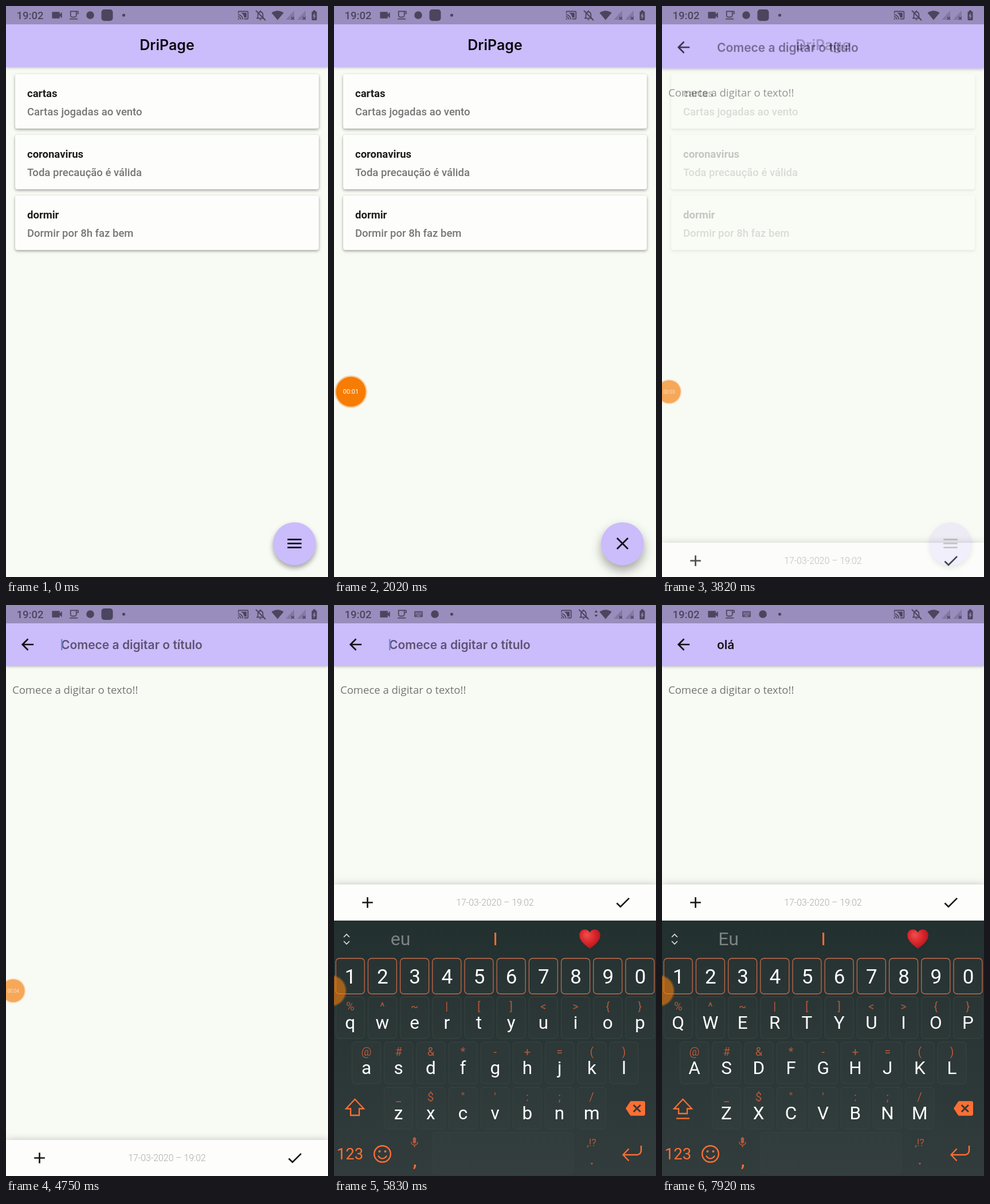
An HTML page with a canvas that plays this animation: 562 by 997 pixels, repeating every 7990 ms.

```html
<!DOCTYPE html>
<html lang="pt">
<head>
<meta charset="utf-8">
<title>Notas</title>
<style>
html, body { margin: 0; width: 100%; height: 100%; overflow: hidden; background: #f8faf4; }
canvas { display: block; width: 562px; height: 997px; }
</style>
</head>
<body>
<canvas id="stage"></canvas>
<script>
const W = 562, H = 997, LOOP = 7990;
const LILAC = '#cbbcfb', PAGE = '#f8faf4', INK = '#4b455e', ORANGE = '#fb6f35', DIM = '#b4583b';
const KEY_EDGE = '#35413f', KEY_FILL = 'rgba(255,255,255,.012)';
const ROBOTO = 'Roboto, sans-serif', TITLE = 'Inter, sans-serif';

const dpr = window.devicePixelRatio || 1;
function makeContext(canvas) {
  canvas.width = W * dpr;
  canvas.height = H * dpr;
  const c = canvas.getContext('2d');
  c.scale(dpr, dpr);
  return c;
}
const screen2d = makeContext(document.getElementById('stage'));
const layer2d = makeContext(document.createElement('canvas'));
let g = screen2d;

const icons = {
  video: 'M17 10.5V7c0-.55-.45-1-1-1H4c-.55 0-1 .45-1 1v10c0 .55.45 1 1 1h12c.55 0 1-.45 1-1v-3.5l4 4v-11l-4 4z',
  cup: 'M20 3H4v10c0 2.21 1.79 4 4 4h6c2.21 0 4-1.79 4-4v-3h2c1.11 0 2-.9 2-2V5c0-1.11-.89-2-2-2zm0 5h-2V5h2v3zM6 5v8c0 1.1.9 2 2 2h6c1.1 0 2-.9 2-2V5zM3 19h17v2H3z',
  keyboard: 'M20 5H4c-1.1 0-2 .9-2 2v10c0 1.1.9 2 2 2h16c1.1 0 2-.9 2-2V7c0-1.1-.9-2-2-2zM5 8h2v2H5zM8 8h2v2H8zM11 8h2v2h-2zM14 8h2v2h-2zM17 8h2v2h-2zM5 11h2v2H5zM8 11h2v2H8zM11 11h2v2h-2zM14 11h2v2h-2zM17 11h2v2h-2zM8 15h8v2H8z',
  cast: 'M21 3H3c-1.1 0-2 .9-2 2v3h2V5h18v14h-7v2h7c1.1 0 2-.9 2-2V5c0-1.1-.9-2-2-2zM1 18v3h3c0-1.66-1.34-3-3-3zm0-4v2c2.76 0 5 2.24 5 5h2c0-3.87-3.13-7-7-7zm0-4v2c4.97 0 9 4.03 9 9h2c0-6.08-4.93-11-11-11zM19 7H6c5 1.5 7 5 8 10h5z',
  bell: 'M12 22c1.1 0 2-.9 2-2h-4c0 1.1.9 2 2 2zm6-6v-5c0-3.07-1.63-5.64-4.5-6.32V4c0-.83-.67-1.5-1.5-1.5s-1.5.67-1.5 1.5v.68C7.64 5.36 6 7.92 6 11v5l-2 2v1h16v-1l-2-2zm-2 1H8v-6c0-2.48 1.51-4.5 4-4.5s4 2.02 4 4.5v6z',
  edit: 'M3 17.25V21h3.75L17.81 9.94l-3.75-3.75L3 17.25zM20.71 7.04c.39-.39.39-1.02 0-1.41l-2.34-2.34c-.39-.39-1.02-.39-1.41 0l-1.83 1.83 3.75 3.75 1.83-1.83z',
  bulb: 'M9 21c0 .55.45 1 1 1h4c.55 0 1-.45 1-1v-1H9v1zm3-19C8.14 2 5 5.14 5 9c0 2.38 1.19 4.47 3 5.74V17c0 .55.45 1 1 1h6c.55 0 1-.45 1-1v-2.26c1.81-1.27 3-3.36 3-5.74 0-3.86-3.14-7-7-7zm2.85 11.1l-.85.6V16h-4v-2.3l-.85-.6C7.8 12.16 7 10.63 7 9c0-2.76 2.24-5 5-5s5 2.24 5 5c0 1.63-.8 3.16-2.15 4.1z',
  back: 'M20 11H7.83l5.59-5.59L12 4l-8 8 8 8 1.41-1.41L7.83 13H20v-2z',
  check: 'M9 16.17L4.83 12l-1.42 1.41L9 19 21 7l-1.41-1.41z',
  add: 'M19 13h-6v6h-2v-6H5v-2h6V5h2v6h6v2z',
  erase: 'M22 3H7c-.69 0-1.23.35-1.59.88L0 12l5.41 8.11c.36.53.9.89 1.59.89h15c1.1 0 2-.9 2-2V5c0-1.1-.9-2-2-2zm-3 12.59L17.59 17 14 13.41 10.41 17 9 15.59 12.59 12 9 8.41 10.41 7 14 10.59 17.59 7 19 8.41 15.41 12 19 15.59z',
  mic: 'M12 14c1.66 0 3-1.34 3-3V5c0-1.66-1.34-3-3-3S9 3.34 9 5v6c0 1.66 1.34 3 3 3zm5.3-3c0 3-2.54 5.1-5.3 5.1S6.7 14 6.7 11H5c0 3.41 2.72 6.23 6 6.72V21h2v-3.28c3.28-.48 6-3.3 6-6.72h-1.7z',
  heart: 'M12 21.3C7.5 17.8 2 13.8 2 8.3 2 5.2 4.4 3 7.2 3c2.1 0 3.9 1.2 4.8 3 .9-1.8 2.7-3 4.8-3C19.6 3 22 5.2 22 8.3c0 5.5-5.5 9.5-10 13z'
};
for (const k in icons) icons[k] = new Path2D(icons[k]);

const clamp = v => Math.max(0, Math.min(1, v));
const ramp = (t, a, b) => clamp((t - a) / (b - a));
const mix = (a, b, k) => a + (b - a) * k;

function bezier(x1, y1, x2, y2) {
  const at = (a, b, s) => 3 * a * s * (1 - s) ** 2 + 3 * b * s * s * (1 - s) + s ** 3;
  return x => {
    let lo = 0, hi = 1;
    for (let i = 0; i < 20; i++) {
      const s = (lo + hi) / 2;
      if (at(x1, x2, s) < x) lo = s; else hi = s;
    }
    return at(y1, y2, lo);
  };
}
const fastOutSlowIn = bezier(.4, 0, .2, 1);
const easeIn = bezier(.42, 0, 1, 1);

function text(s, x, y, font, color, align = 'left') {
  g.font = font;
  g.fillStyle = color;
  g.textAlign = align;
  g.fillText(s, x, y);
}
function icon(name, x, y, size, color) {
  g.save();
  g.translate(x - size / 2, y - size / 2);
  g.scale(size / 24, size / 24);
  g.fillStyle = color;
  g.fill(icons[name], 'evenodd');
  g.restore();
}
function rect(x, y, w, h, color, r = 0) {
  g.beginPath();
  g.roundRect(x, y, w, h, r);
  g.fillStyle = color;
  g.fill();
}
function disc(x, y, r, color) {
  g.beginPath();
  g.arc(x, y, Math.max(0, r), 0, 7);
  g.fillStyle = color;
  g.fill();
}
function ring(x, y, r, color, width, from = 0, to = 2 * Math.PI) {
  g.beginPath();
  g.arc(x, y, r, from, to);
  g.strokeStyle = color;
  g.lineWidth = width;
  g.stroke();
}
function line(points, color, width, close) {
  g.beginPath();
  points.forEach(([x, y]) => g.lineTo(x, y));
  if (close) g.closePath();
  g.strokeStyle = color;
  g.lineWidth = width;
  g.stroke();
}
function shadowed(dy, blur, alpha, draw) {
  g.save();
  g.shadowColor = `rgba(0,0,0,${alpha})`;
  g.shadowOffsetY = dy * dpr;
  g.shadowBlur = blur * dpr;
  draw();
  g.restore();
}
// Draws a group as one sheet with a shared opacity.
function sheet(alpha, dy, draw) {
  if (alpha <= 0) return;
  g = layer2d;
  g.clearRect(0, 0, W, H);
  draw();
  g = screen2d;
  g.globalAlpha = alpha;
  g.drawImage(layer2d.canvas, 0, dy, W, H);
  g.globalAlpha = 1;
}

function header() {
  rect(0, 0, W, H, PAGE);
  shadowed(1.5, 5, .28, () => rect(0, 0, W, 106.5, LILAC));
}

function menuIcon(m) {
  const k = clamp(m / .45), len = mix(24.5, m > .9 ? 27 : 23, m);
  const bar = (angle, dy, alpha) => {
    g.save();
    g.globalAlpha *= alpha;
    g.translate(503.5, 938.5 + dy);
    g.rotate(angle * Math.PI / 180);
    rect(-len / 2, -1.35, len, 2.7, '#0b0a10');
    g.restore();
  };
  bar(45 * m, -7 * (1 - k), 1);
  bar(0, 0, 1 - k);
  bar(45 * m + 90 * k, 7 * (1 - k), 1);
}

function mini(name, y, s) {
  if (s <= 0) return;
  const d = 63 * s;
  shadowed(5, 9, .35, () => disc(503.5, y, d / 2, LILAC));
  icon(name, 503.5, y, Math.min(33, d * .63), '#0b0a10');
}

function listPage(t) {
  header();
  text('DriPage', 281, 77, `600 25px ${TITLE}`, '#08070c', 'center');
  [['cartas', 'Cartas jogadas ao vento'],
   ['coronavirus', 'Toda precaução é válida'],
   ['dormir', 'Dormir por 8h faz bem']].forEach(([name, body], i) => {
    const y = 119 + 106 * i;
    shadowed(2, 5, .36, () => rect(16, y, 530, 95, '#fdfefb', 4));
    text(name, 37, y + 40, `700 18.5px ${ROBOTO}`, '#1c1d1c');
    text(body, 37, y + 71.5, `500 18.5px ${ROBOTO}`, '#757675');
  });

  const close = 1 - ramp(t, 3440, 3593);
  const open = ramp(t, 2030, 2190) * close;
  const lift = ramp(t, 1850, 1980) * (1 - ramp(t, 2150, 2300));
  const s = clamp(open * 1.4);
  mini('edit', 761 + 30 * (1 - open), open);
  mini('bulb', 846 + 14 * (1 - s), s);
  shadowed(mix(5, 9, lift), mix(9, 18, lift), .34, () => disc(503.5, 939, 37.5, LILAC));
  menuIcon(Math.min(ramp(t, 1870, 2000), clamp(close * 1.1)));
}

function editPage(t) {
  header();
  const typed = 'olá'.slice(0, [6250, 6620, 7050].filter(x => t >= x).length);
  icon('back', 37.5, 69, 32, '#0d0b12');
  const font = `600 21px ${TITLE}`;
  text(typed || 'Comece a digitar o título', 96, 77, font, typed ? '#15121c' : '#5c5374');
  const typing = t > 6250 && t < 7300;
  if (t > 4600 && t < 7750 && (typing || (t - 4600) % 1000 < 500)) {
    g.font = font;
    rect(96 + (typed ? g.measureText(typed).width : 0), 59.5, 2.5, 19.5, '#6f8fdf');
  }
  text('Comece a digitar o texto!!', 11, 155, '400 18.5px "Open Sans", sans-serif', '#747674');

  const y = t < 4900 ? 934 : 488;
  shadowed(5, 16, .42, () => rect(0, y, W, 63, '#fdfefb'));
  icon('add', 58.5, y + 31.5, 32, '#17171a');
  text('17-03-2020 – 19:02', 281, y + 37, `300 15.8px ${ROBOTO}`, '#a9aba9', 'center');
  icon('check', 504, y + 31.5, 32, '#17171a');
}

function key(x, y, w, h, border, fill) {
  rect(x, y, w, h, fill, 6);
  g.strokeStyle = border;
  g.lineWidth = 1.3;
  g.stroke();
}

function keyRow(letters, hints, x0, y, caps) {
  [...letters].forEach((c, i) => {
    const x = x0 + 56.2 * i;
    key(x - 25, y, 50, 73, KEY_EDGE, KEY_FILL);
    text(hints[i], x, y + 24, `400 20px ${ROBOTO}`, DIM, 'center');
    text(caps ? c.toUpperCase() : c, x, y + 56, `400 31.5px ${ROBOTO}`, '#fff', 'center');
  });
}

function suggestions(caps) {
  line([[17, 580], [22, 575], [27, 580]], '#dfe3e2', 1.6);
  line([[17, 587], [22, 592], [27, 587]], '#dfe3e2', 1.6);
  text(caps ? 'Eu' : 'eu', 116, 594, `400 32px ${ROBOTO}`, '#7b8384', 'center');
  text('I', 281.5, 594, `400 32px ${ROBOTO}`, ORANGE, 'center');
  const red = g.createRadialGradient(9, 8, 1, 11, 10, 13);
  red.addColorStop(0, '#ee4a48');
  red.addColorStop(.5, '#d8252b');
  red.addColorStop(1, '#a5141d');
  icon('heart', 446.5, 583, 44, red);
}

function keyboard(caps, ready) {
  const back = g.createLinearGradient(0, 551, 0, H);
  back.addColorStop(0, '#22302f');
  back.addColorStop(1, '#323c3c');
  rect(0, 551, W, 446, back);
  g.globalAlpha = ready;
  suggestions(caps);
  g.globalAlpha = 1;

  [...'1234567890'].forEach((c, i) => {
    const x = 28.2 + 56.2 * i;
    key(x - 25, 617, 50, 62, '#c8694a', KEY_FILL);
    text(c, x + .5, 660.5, `400 35px ${ROBOTO}`, '#fff', 'center');
  });
  keyRow('qwertyuiop', '%^~|[]<>{}', 28.2, 684, caps);
  keyRow('asdfghjkl', '@#&*-+=()', 56.5, 763, caps);
  keyRow('zxcvbnm', '_$"\':;/', 112.5, 842, caps);

  const b = caps ? 888 : 891;
  line([[36.5, 863], [52, 879.5], [44, 879.5], [44, b], [29, b], [29, 879.5], [21, 879.5]], ORANGE, 2.3, true);
  if (caps) line([[25, 896.5], [48, 896.5]], ORANGE, 2.3);
  icon('erase', 526, 879, 34, ORANGE);

  text('123', 28, 967.5, `400 27.5px ${ROBOTO}`, ORANGE, 'center');
  ring(84.5, 958.5, 14.3, ORANGE, 2.4);
  ring(84.5, 958.5, 8, ORANGE, 2.2, .12 * Math.PI, .88 * Math.PI);
  disc(79.5, 954, 2, ORANGE);
  disc(89.5, 954, 2, ORANGE);
  icon('mic', 140.5, 938.5, 22, DIM);
  text(',', 141, 980, `500 30px ${ROBOTO}`, ORANGE, 'center');
  key(172, 921, 246, 73, KEY_EDGE, KEY_FILL);
  text(',!?', 449.5, 945, `400 18px ${ROBOTO}`, DIM, 'center');
  text('.', 450, 977, `500 24px ${ROBOTO}`, DIM, 'center');
  g.lineJoin = 'round';
  line([[536, 944], [536, 954], [534, 958], [530, 960], [505, 960]], ORANGE, 2.5);
  line([[514.5, 949.5], [504.5, 960], [514.5, 970.5]], ORANGE, 2.5);
  g.lineJoin = 'miter';
}

function statusBar(t) {
  rect(0, 0, W, 32, 'rgba(0,0,0,.25)');
  text('19:02', 18.5, 23, `500 18.5px ${ROBOTO}`, INK);
  icon('video', 89, 16, 23, INK);
  icon('cup', 118.5, 16, 20, INK);
  const p = ramp(t, 4870, 5000);
  g.globalAlpha = .8 * p ** 5;
  icon('keyboard', 147.5, 16, 18, INK);
  g.globalAlpha = 1;
  disc(147 + 29 * p, 16, 6.8, INK);
  if (p === 0) {
    rect(166.5, 6, 20, 20, INK, 5);
    disc(205.5, 16, 2.6, INK);
  } else {
    disc(176.5 + 29 * p, 16, 2.6, INK);
  }

  const busy = t > 5500 && t < 6300;
  const dx = busy ? -8.5 : 0;
  icon('cast', 414 + dx, 16, 20, INK);
  icon('bell', 444 + dx, 16, 21, INK);
  line([[436 + dx, 8], [453 + dx, 25]], INK, 2);
  if (busy) {
    g.fillStyle = INK;
    for (const s of [-1, 1]) {
      g.beginPath();
      g.moveTo(454.5, 15 + 2 * s);
      g.lineTo(460.5, 15 + 2 * s);
      g.lineTo(457.5, 15 + 6 * s);
      g.fill();
    }
  }
  g.beginPath();
  g.moveTo(474, 24.5);
  g.lineTo(463.5, 12);
  g.quadraticCurveTo(474, 4.5, 484.5, 12);
  g.fillStyle = INK;
  g.fill();
  for (const x of [488, 508]) {
    g.beginPath();
    g.moveTo(x, 24);
    g.lineTo(x + 15, 24);
    g.lineTo(x + 15, 8);
    g.fillStyle = '#8278a4';
    g.fill();
    line([[x + 10, 19], [x + 15, 24]], INK, 1.5);
    line([[x + 15, 19], [x + 10, 24]], INK, 1.5);
  }
  rect(533.5, 9.5, 9, 15.5, INK, 1.5);
  rect(536, 7.5, 4, 3, INK);
  line([[539, 13], [536.5, 17.5], [539.5, 17.5], [537, 22]], '#9a90be', 1.3);
}

function timer(t) {
  const show = ramp(t, 650, 850);
  if (!show) return;
  const dock = fastOutSlowIn(ramp(t, 2300, 2580));
  const hide = fastOutSlowIn(ramp(t, 5150, 5450));
  const x = mix(mix(29.5, 12.5, dock), -6, hide);
  const r = mix(mix(26, 20, dock), 26, hide) * show;
  g.globalAlpha = mix(mix(1, .55, dock), .48, hide) * show;
  disc(x, 673.5, r * 1.09, 'rgba(246,140,40,.45)');
  disc(x, 673.5, r, '#f67c04');
  if (hide < .5) {
    g.globalAlpha = show * mix(1, .65, dock);
    const n = Math.max(0, Math.floor((t - 130) / 1000));
    text('00:0' + n, x, 673.5 + r * .15, `400 ${mix(11, 8.3, dock)}px ${ROBOTO}`, '#fff', 'center');
  }
  g.globalAlpha = 1;
}

let start;
function frame(now) {
  start ??= now;
  const t = (now - start) % LOOP;
  g = screen2d;
  const p = ramp(t, 3440, 3885);
  if (p < 1) listPage(t);
  sheet(easeIn(p), 249 * (1 - fastOutSlowIn(p)), () => editPage(t));
  const k = ramp(t, 4900, 5150);
  sheet(ramp(t, 4900, 4997), 89 * (1 - k) ** 2.4, () => keyboard(t > 7750, ramp(t, 4930, 5110)));
  statusBar(t);
  timer(t);
  requestAnimationFrame(frame);
}
requestAnimationFrame(frame);
</script>
</body>
</html>
```
